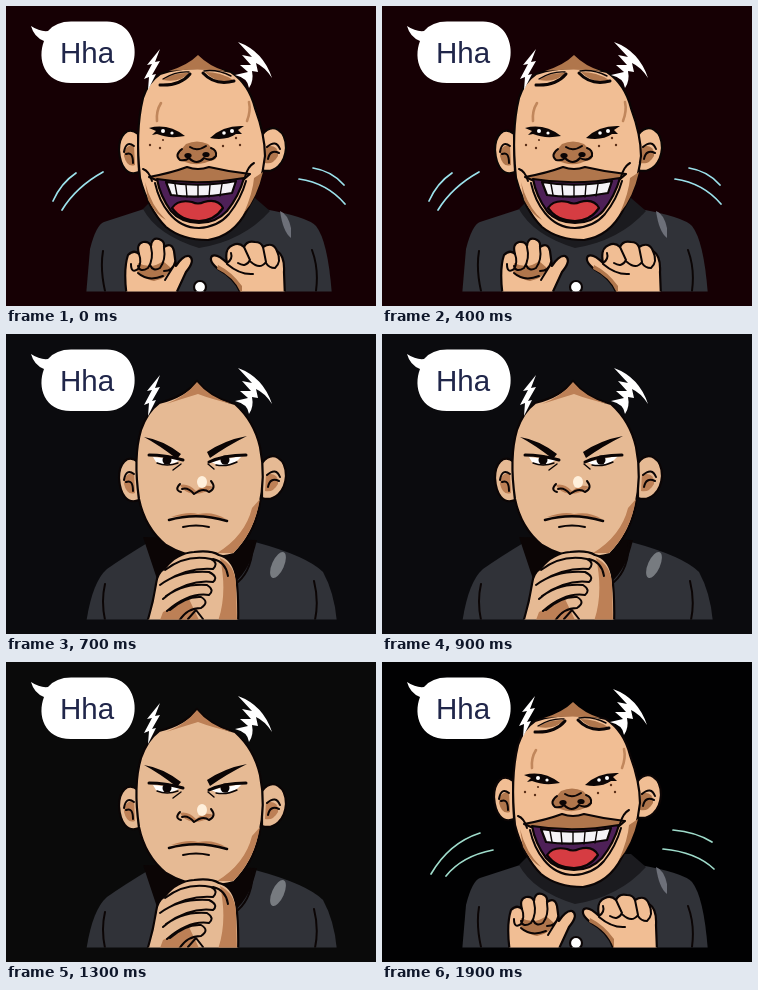
An HTML page for the animation above (2000 ms loop, 370 by 300 pixels).

```html
<!DOCTYPE html>
<html lang="en">
<head>
<meta charset="utf-8">
<title>Mood swing</title>
<style>
  html, body { margin: 0; width: 100%; height: 100%; overflow: hidden; background: #160004; }
  svg { display: block; width: 100vw; height: 100vh; }
  text { font: 29.5px "Liberation Sans", Arial, sans-serif; fill: #20264a; }
  .line { fill: none; stroke: #0b0505; stroke-width: 2; stroke-linecap: round; stroke-linejoin: round; }
  .edge { stroke: #0b0505; stroke-width: 2.2; stroke-linejoin: round; }
  .thin { stroke-width: 1.4; }
  .ink { fill: #0b0505; }
  .white { fill: #fff; }
  .suit { fill: #303238; }
  .collar { fill: #1b1b1f; }
  .skin { fill: var(--skin); }
  .shade { fill: var(--shade); }
  #laugh { --skin: #f1be94; --shade: #b0764c; }
  #stern { --skin: #e6ba94; --shade: #bd8056; }
  .shake { fill: none; stroke-width: 1.7; stroke-linecap: round; }
</style>
</head>
<body>
<svg viewBox="0 0 370 300">
  <defs>
    <clipPath id="crop"><path d="M0 0H370V285.5H0Z"/></clipPath>
    <g id="ears">
      <path class="skin edge" d="M132 128C121 119 113 130 113 144C114 160 121 171 133 166Z"/>
      <path class="shade" d="M128 139Q118 139 118 150Q121 162 129 159Z"/>
      <path class="line" d="M128 140Q120 134 118 146M120 148Q127 145 127 157"/>
      <path class="skin edge" d="M256 129C267 115 280 125 280 142C279 158 268 168 256 164Z"/>
      <path class="shade" d="M260 140Q273 138 272 150Q267 159 259 157Z"/>
      <path class="line" d="M261 141Q270 133 274 143M273 147Q264 143 262 153"/>
    </g>
    <g id="streaks" class="white">
      <path d="M154 41L141 57L146 56L138 71L143 69L142 82L150 66L146 67L154 53L149 54Z"/>
      <path d="M232 34Q257 43 266 70Q259 59 250 55L252 64L246 63Q248 73 243 80Q242 70 229 67L242 64L234 57L245 57L236 47L246 49Z"/>
    </g>
  </defs>

  <rect id="backdrop" width="370" height="300"/>

  <g id="laugh" clip-path="url(#crop)">
    <path class="suit" d="M80 290L84 243Q90 219 98 216L138 203H258Q302 211 310 220Q322 235 326 290Z"/>
    <path class="line" d="M97 245Q94 263 99 285M306 244Q313 263 310 285"/>
    <path class="collar" d="M137 203Q151 229 193 242Q237 235 264 205L249 192H148Z"/>
    <path d="M274 205Q282 208 285 222V232Q277 226 274 205Z" fill="#6d7079"/>
    <g id="head">
      <use href="#ears"/>
      <path class="skin edge" d="M154 68Q188 57 225 66Q243 78 249 102Q259 129 259 150Q256 180 241 204Q228 230 202 234Q176 234 160 221Q142 203 134 172Q129 125 137 92Q142 76 154 68Z"/>
      <path class="shade" d="M257 166Q251 192 238 207Q247 186 248 172ZM139 176Q145 200 160 214Q150 209 142 194Z"/>
      <path class="shade" d="M163 65Q182 59 192 49Q203 60 219 65Q190 62 163 65Z"/>
      <use href="#streaks" y="2"/>
      <path class="shade" d="M157 74Q168 66 183 67Q174 77 157 74ZM199 66Q215 66 227 74Q212 79 199 66Z"/>
      <path class="line" style="stroke-width:3" d="M154 79Q174 80 184 68M197 67Q209 80 228 75"/>
      <path class="line thin" d="M157 73Q170 65 183 66M198 65Q211 63 225 70"/>
      <path class="line" style="stroke:#c1875c;stroke-width:2.6" d="M155 97Q150 105 151 115M243 96Q245 105 241 115"/>
      <path class="ink" d="M143 122Q162 117 179 130Q163 133 151 128L146 129L150 125ZM204 132Q217 119 238 120L232 124L236 128L230 128Q220 135 204 132Z"/>
      <g class="white">
        <circle cx="157" cy="125" r="2"/><circle cx="166" cy="127" r="1.6"/>
        <circle cx="218" cy="127" r="1.8"/><circle cx="226" cy="125" r="2"/>
      </g>
      <path class="shade" d="M180 138Q191 133 202 138L211 147Q212 154 204 155Q192 161 179 156Q170 154 172 147Z"/>
      <path class="line" d="M176 143Q168 149 174 154Q180 155 183 152Q191 160 198 152Q205 156 210 150Q211 144 205 142M184 141Q191 146 200 140"/>
      <ellipse class="ink" cx="182" cy="149.5" rx="3.6" ry="2.6"/>
      <ellipse class="ink" cx="200" cy="148.5" rx="3.6" ry="2.6"/>
      <g fill="#5a3019">
        <circle cx="144" cy="139" r="1.2"/><circle cx="154" cy="142" r="1.2"/><circle cx="157" cy="134" r="1.1"/>
        <circle cx="217" cy="140" r="1.2"/><circle cx="230" cy="132" r="1.2"/><circle cx="234" cy="139" r="1.2"/>
      </g>
      <path class="shade edge" d="M143 171Q165 167 181 161Q192 165 203 161Q224 166 244 168L237 174Q193 181 150 174Z"/>
      <path class="edge" fill="#4e2057" d="M151 173Q193 180 238 172Q233 190 221 205Q210 217 193 217Q174 216 165 205Q154 190 151 173Z"/>
      <path class="edge" fill="#d63c42" d="M166 202Q172 193 186 196Q192 199 198 196Q212 192 217 202Q208 215 193 215Q175 215 166 202Z"/>
      <path class="edge" fill="#f4f2f6" d="M160 176Q193 182 230 175L226 187Q193 193 165 189Z"/>
      <path class="line thin" d="M169 178L171 189M180 179L181 191M192 179V191M204 179L203 191M216 178L214 190"/>
      <path class="line" d="M137 163Q143 165 146 175M248 157Q242 160 239 171M149 177Q153 195 163 207Q175 222 193 222Q212 221 223 208Q235 193 240 175"/>
    </g>
    <circle class="white edge" cx="194" cy="281" r="6"/>
    <g id="leftHand">
      <path class="skin edge" d="M121 292Q117 264 122 249Q128 243 133 248Q130 238 137 236Q143 235 145 240Q146 231 153 233Q159 235 158 241Q166 236 168 245L170 260Q177 249 183 250Q190 254 180 266Q174 279 168 292Z"/>
      <path class="shade" d="M132 257Q146 264 157 255L165 262Q161 273 148 275Q137 273 131 265Z"/>
      <path class="line" d="M133 248Q136 256 132 263Q125 268 125 258M145 241Q148 253 142 262Q134 267 132 260M158 242Q160 254 154 262Q147 266 144 259M169 256Q167 265 158 265M132 267Q142 276 157 270M169 258Q162 269 159 274"/>
    </g>
    <g id="rightHand">
      <path class="skin edge" d="M236 292Q232 274 212 263Q202 255 206 250Q211 247 221 257Q218 242 227 239Q233 236 238 241Q241 234 249 236Q255 236 257 241Q267 235 271 245Q279 250 278 266L279 292Z"/>
      <path class="shade" d="M212 259Q226 266 236 280V290Q230 272 211 263Z"/>
      <path class="line" d="M221 257Q227 253 225 247M238 241L244 254Q240 262 232 257M257 241L260 256Q254 264 245 256M271 245Q276 256 269 262Q263 262 260 257M221 258Q234 269 247 268"/>
    </g>
  </g>

  <path class="shake" id="shakeWide" stroke="#9be2ec" d="M47 195Q55 177 70 167M56 204Q70 181 97 166M307 162Q326 165 338 179M293 173Q321 177 339 198"/>
  <path class="shake" id="shakeNear" stroke="#9fdccb" d="M49 212Q67 181 98 171M64 214Q80 194 111 188M291 168Q314 170 330 180M281 187Q314 190 332 207"/>

  <g id="stern" clip-path="url(#crop)">
    <path class="suit" d="M80 290Q86 248 101 235Q118 223 143 208H249Q301 222 317 238Q329 260 331 290Z"/>
    <path class="ink" d="M137 203L151 245L229 248Q244 236 251 206Z"/>
    <path class="line" d="M99 250Q95 267 99 286M308 247Q313 267 309 286M232 248Q247 235 247 207"/>
    <ellipse cx="272" cy="231" rx="6" ry="14" fill="#777b80" transform="rotate(24 272 231)"/>
    <use href="#ears"/>
    <path class="skin edge" d="M191 47Q203 63 229 70Q248 87 254 113Q260 142 253 174Q247 201 228 220Q190 230 160 211Q139 194 133 165Q127 123 135 96Q141 78 153 69Q180 62 191 47Z"/>
    <path class="shade" d="M191 48Q203 63 226 70Q205 65 192 60Q179 64 160 70Q180 62 191 48ZM254 165Q248 199 227 219H211Q239 202 246 174Z"/>
    <use href="#streaks"/>
    <path class="ink" d="M138 103Q157 106 175 120L171 125Q153 111 138 103ZM241 102Q219 106 201 118L204 124Q221 112 241 102Z"/>
    <path class="white" d="M147 123L174 126Q162 134 150 128ZM205 128L236 122Q228 132 214 132Z"/>
    <circle class="ink" cx="161" cy="126" r="4.5"/><circle class="ink" cx="219" cy="126" r="4.5"/>
    <path class="line" style="stroke-width:3" d="M143 121Q159 121 177 126M203 128Q218 121 240 121"/>
    <path class="line thin" d="M151 129Q161 133 172 129M210 131Q221 133 231 128M167 136L175 130M208 135L202 130"/>
    <path class="shade" d="M174 151Q182 149 190 157Q199 149 207 153Q199 160 188 160Q177 158 174 151Z"/>
    <ellipse cx="196" cy="148" rx="5" ry="6" fill="#fff0dc"/>
    <path class="line" d="M174 150Q168 156 175 158M176 155Q182 153 188 160Q197 153 203 158Q211 154 205 147"/>
    <path class="shade" d="M165 183Q182 177 192 180Q207 177 220 185Q193 180 165 183Z"/>
    <path class="line" style="stroke-width:2.6" d="M163 186Q191 178 221 187"/>
    <path class="line" d="M177 193Q190 190 203 193"/>
    <path class="skin edge" d="M140 292Q147 270 150 250Q151 239 159 234Q171 219 188 218Q205 216 213 221Q226 224 230 241Q233 264 232 292Z"/>
    <path class="shade" d="M214 224Q229 231 230 250L231 290H211Q222 261 214 224ZM157 278L183 265L193 286H154Z"/>
    <path class="line" d="M159 236Q180 220 205 225Q213 229 207 235Q183 233 160 247M154 251Q174 236 203 238Q213 243 207 248Q184 245 160 262M157 265Q175 249 201 251Q209 256 203 261Q183 258 161 277M164 276Q180 262 195 263Q204 268 195 274Q181 274 173 287M182 285L190 276L197 285M207 225Q220 228 222 242"/>
  </g>

  <path class="white" d="M25 20Q34 26 42 25Q50 15.5 65 15.5H101C138 15.5 138 77 101 77H65C38 77 31 53 38 35Q28 31 25 20Z"/>
  <text x="54" y="57">Hha</text>
</svg>
<script>
  const el = id => document.getElementById(id);
  const show = (id, on) => el(id).setAttribute("visibility", on ? "visible" : "hidden");

  // Head and fists shake between two positions while laughing.
  const raised = {
    head: "translate(-1 -9)",
    leftHand: "translate(7 -1)",
    rightHand: "translate(-4 -3)"
  };

  function backdropAt(step) {
    if (step < 7) return "#160004";
    if (step < 13) return "#0b0b0e";
    return step < 19 ? "#0a0a0a" : "#010102";
  }

  function draw(now) {
    const step = Math.floor(now % 2000 / 100);
    const laughing = step < 7 || step === 19;
    const up = step % 2 === 1;
    el("backdrop").setAttribute("fill", backdropAt(step));
    show("laugh", laughing);
    show("stern", !laughing);
    show("shakeWide", laughing && !up);
    show("shakeNear", laughing && up);
    for (const id in raised) el(id).setAttribute("transform", up ? raised[id] : "");
  }

  const start = performance.now();
  function tick() {
    draw(performance.now() - start);
    requestAnimationFrame(tick);
  }
  tick();
</script>
</body>
</html>
```
